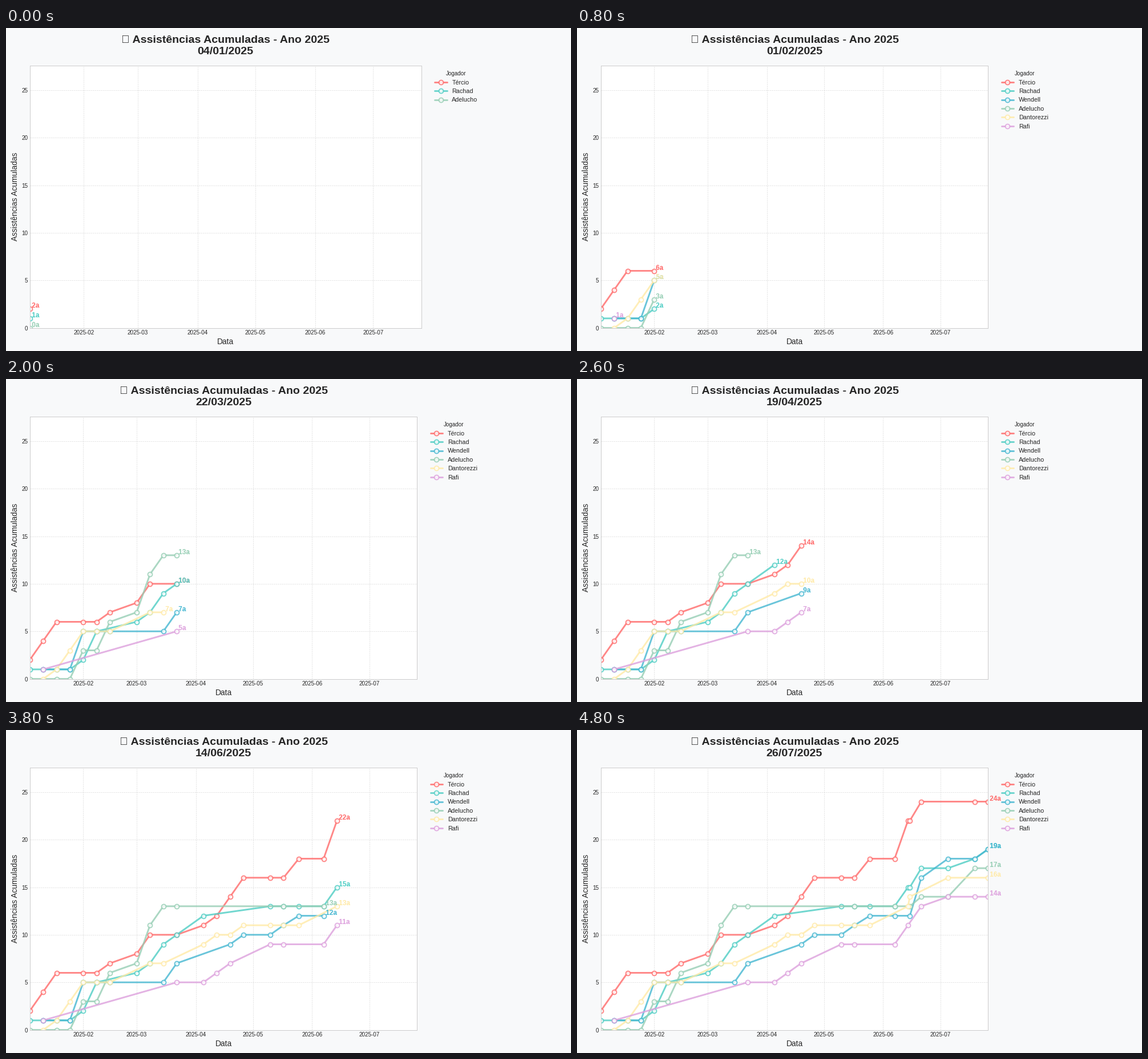
A matplotlib script that plays this animation: 990x566 px, repeating every 5 s.

```python
import numpy as np
import matplotlib.pyplot as plt
from matplotlib.animation import FuncAnimation

plt.style.use("seaborn-v0_8-whitegrid")
plt.rcParams["font.family"] = "Liberation Sans"

WIDTH, HEIGHT = 990, 566
DPI = 70.75
BACKGROUND = "#f8f9fa"
LEFT, TOP, BOTTOM = 41.7, 65.5, 525.5

START = np.datetime64("2025-01-04")
DAYS = np.array([0, 7, 14, 21, 28, 35, 42, 56, 63, 70, 77, 91, 98, 105, 112,
                 126, 133, 141, 154, 161, 162, 168, 182, 196, 203])
MONTHS = np.arange("2025-02", "2025-08", dtype="datetime64[M]")
MONTH_DAYS = (MONTHS.astype("datetime64[D]") - START).astype(int)

na = np.nan  # player absent on that day
# name: (colour, running total of assists on each match day)
PLAYERS = {
    "Tércio": ("#FF6B6B", [2, 4, 6, na, 6, 6, 7, 8, 10, na, 10, 11, 12, 14, 16,
                           16, 16, 18, 18, 22, 22, 24, na, 24, 24]),
    "Rachad": ("#4ECDC4", [1, 1, na, 1, 2, 5, na, 6, 7, 9, 10, 12, na, na, na,
                           13, 13, 13, 13, 15, 15, 17, 17, 18, 19]),
    "Wendell": ("#45B7D1", [na, 1, 1, 1, 5, 5, 5, na, na, 5, 7, na, na, 9, 10,
                            10, 11, 12, 12, na, 12, 16, 18, 18, 19]),
    "Adelucho": ("#96CEB4", [0, na, 0, 0, 3, 3, 6, 7, 11, 13, 13, na, na, na, na,
                             na, 13, na, 13, na, 13, 14, 14, 17, 17]),
    "Dantorezzi": ("#FFEAA7", [na, 0, 1, 3, 5, 5, 5, na, 7, 7, na, 9, 10, 10, 11,
                               11, 11, 11, na, 13, 14, na, 16, na, 16]),
    "Rafi": ("#DDA0DD", [na, 1, na, na, na, na, na, na, na, na, 5, 5, 6, 7, na,
                         9, 9, na, 9, 11, na, 13, 14, 14, 14]),
}
Y_MAX = 1.15 * max(np.nanmax(totals) for _, totals in PLAYERS.values())

fig = plt.figure(figsize=(13.993, 8), dpi=DPI, facecolor=BACKGROUND)
ax = fig.add_subplot()


def draw_player(name, color, totals, step):
    values = np.array(totals[:step + 1], dtype=float)
    played = ~np.isnan(values)
    if not played.any():
        return
    x, y = DAYS[:step + 1][played], values[played]
    ax.plot(x, y, color=color, lw=3, alpha=0.8, marker="o", markersize=8,
            markerfacecolor="white", markeredgewidth=2, label=name)
    ax.text(x[-1], y[-1] + 0.1, f" {y[-1]:.0f}a", color=color,
            fontsize=12, fontweight="bold")


def place_axes(right):
    ax.set_position([LEFT / WIDTH, 1 - BOTTOM / HEIGHT,
                     (right - LEFT) / WIDTH, (BOTTOM - TOP) / HEIGHT])


def update(step):
    ax.clear()
    # the plot is wider while the legend only holds short names
    place_axes(727.7 if step == 0 else 720.3)
    for name, (color, totals) in PLAYERS.items():
        draw_player(name, color, totals, step)

    ax.set_xlim(0, DAYS[-1])
    ax.set_ylim(0, Y_MAX)
    ax.set_xticks(MONTH_DAYS, [str(month) for month in MONTHS])
    ax.set_yticks(range(0, 26, 5))
    ax.tick_params(labelsize=10)
    ax.grid(True, linestyle="--", linewidth=0.7, alpha=0.7)

    date = "/".join(reversed(str(START + DAYS[step]).split("-")))
    ax.set_title(f"\U0001F3AF Assistências Acumuladas - Ano 2025\n{date}",
                 fontsize=20, fontweight="bold", pad=20)
    ax.set_xlabel("Data", fontsize=14)
    ax.set_ylabel("Assistências Acumuladas", fontsize=14)
    ax.legend(title="Jogador", title_fontsize=10, fontsize=11,
              loc="upper left", bbox_to_anchor=(1.02, 1), frameon=False)
    return []


anim = FuncAnimation(fig, update, frames=len(DAYS), interval=200,
                     init_func=lambda: [], repeat=True, repeat_delay=0)
plt.show()
```
